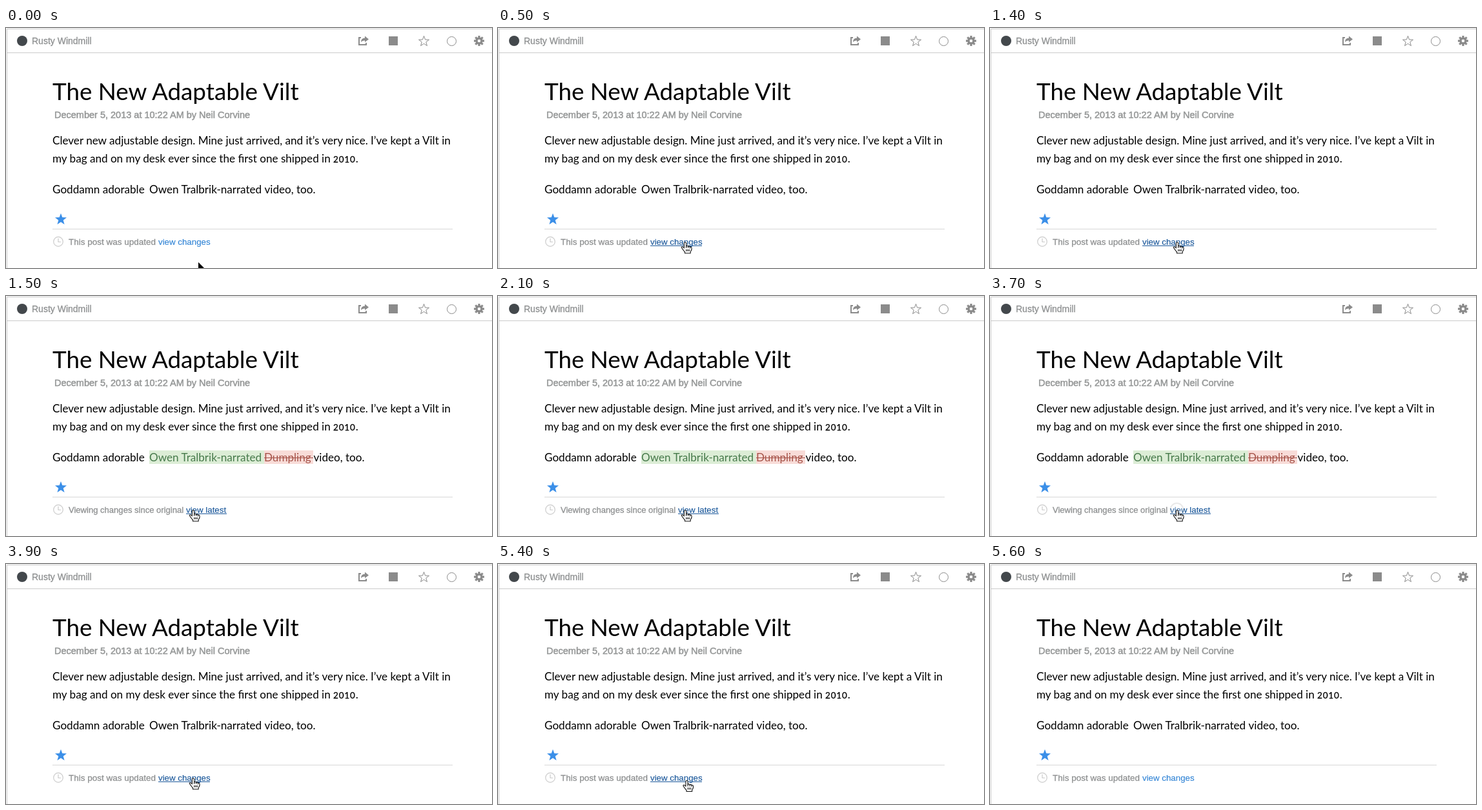
These frames come from a looping animation (753 px wide and 373 px high, 5700 ms). An HTML page:

```html
<!DOCTYPE html>
<html lang="en">
<head>
<meta charset="utf-8">
<title>Post changes</title>
<style>
  html, body { margin: 0; width: 100%; height: 100%; overflow: hidden; background: #fff; }
  svg { display: block; }
  .article { font-family: Lato, sans-serif; font-size: 17.1px; }
  .title { font-family: Lato, sans-serif; font-size: 36.8px; }
  .year { font-size: 13.5px; letter-spacing: .8px; stroke: #000; stroke-width: .25px; }
  .ui { font-family: "Liberation Sans", Arial, sans-serif; font-size: 13.3px; fill: #8e9091; stroke: #8e9091; stroke-width: .3px; }
  .date { font-size: 14.5px; fill: #959797; stroke: #959797; stroke-width: .5px; }
  .link { fill: #3486d6; stroke: #3486d6; stroke-width: .15px; }
  .hover { fill: #1e5a9c; stroke: #1e5a9c; stroke-width: .15px; }
  .icon { fill: #8b8b8b; }
  .line { fill: none; stroke: #8b8b8b; }
  .rule { fill: none; stroke: #cbcbcb; }
</style>
</head>
<body>
<svg width="753" height="373" viewBox="0 0 753 373">
  <path class="rule" d="M753 1.5H1.5V373M1 38.5H753"/>

  <!-- Toolbar -->
  <circle cx="25" cy="20" r="8" fill="#43484c"/>
  <text class="ui" x="40" y="25" style="font-size:14px">Rusty Windmill</text>
  <path class="line" stroke-width="2" d="M550 15H547V26H558V23"/>
  <path class="icon" d="M556 12.5L562 17.5L556 22V19.5Q552 19 550 22Q550 15.5 556 15.5Z"/>
  <rect class="icon" x="593" y="13" width="14" height="14"/>
  <path id="outlineStar" class="line"/>
  <circle class="line" cx="690.5" cy="20.5" r="7"/>
  <g id="gear" transform="translate(733 20)">
    <circle class="line" r="4" stroke-width="3.4"/>
  </g>

  <!-- Article -->
  <text class="title" x="72" y="112">The New Adaptable Vilt</text>
  <text class="ui date" x="75" y="140">December 5, 2013 at 10:22 AM by Neil Corvine</text>
  <g class="article">
    <text x="72" y="181">Clever new adjustable design. Mine just arrived, and it’s very nice. I’ve kept a Vilt in</text>
    <text x="72" y="209">my bag and on my desk ever since the first one shipped in <tspan class="year">2010</tspan>.</text>
    <text x="72" y="257">Goddamn adorable</text>
    <g id="marks">
      <path fill="#dcedd6" d="M222 240H400V261H222Z"/>
      <path fill="#f8dcd8" d="M400 240H476V261H400Z"/>
      <text x="400" y="257" fill="#a65349">Dumpling</text>
      <path stroke="#a65349" d="M400 251.5H476"/>
    </g>
    <text id="added" x="222" y="257">Owen Tralbrik-narrated</text>
    <text id="ending" y="257">video, too.</text>
  </g>

  <!-- Footer -->
  <path id="blueStar" fill="#3b8fe8"/>
  <path stroke="#d8d8d8" d="M72 312.5H692"/>
  <g class="rule" stroke-width="1.2">
    <circle cx="81" cy="332" r="7.3"/>
    <path d="M81 327V332.5H85"/>
  </g>
  <text id="status" class="ui" x="97" y="337"></text>
  <text id="link" class="ui" y="337"></text>
  <path id="underline" stroke="#1e5a9c"/>

  <!-- Pointer -->
  <circle id="ring" cx="289.5" cy="332" fill="#fff" fill-opacity=".9" stroke="#888" stroke-width="2"/>
  <path id="arrow" d="M0 0V16L3.8 12.5L6.3 18L9 17L6.6 11.5H11.5Z" stroke="#fff" stroke-width="1" paint-order="stroke"/>
  <g id="hand" fill="#fff" stroke="#111" stroke-width="1.1" stroke-linejoin="round">
    <path d="M-1.6 9V1.4Q-1.4 0 0 0T1.6 1.4V6Q3.6 4.6 4.6 6.5Q6.6 5.4 7.4 7.3Q10 6.8 10 9V11Q9.5 13 8.2 14.5V17H-.5V15Q-2.5 13.2-4 10.5Q-6.5 8-5 7Q-3.5 6.6-1.6 9Z"/>
    <path fill="none" d="M1.6 6V9M4.6 6.5V9M7.4 7.3V9.5M1.8 11V14M4 11V14M6.2 11V14"/>
  </g>
</svg>
<script>
const LOOP = 5700, STEP = 100;
const FIRST_CLICK = 1000, SECOND_CLICK = 3400, RESPONSE = 500;
const $ = id => document.getElementById(id);
const show = (id, visible) => $(id).style.display = visible ? "" : "none";

function starPath(cx, cy, radius) {
  const points = Array.from({ length: 10 }, (_, i) => {
    const r = i % 2 ? radius * 0.41 : radius;
    const angle = (i / 5 - 0.5) * Math.PI;
    return `${cx + r * Math.cos(angle)} ${cy + r * Math.sin(angle)}`;
  });
  return `M${points.join("L")}Z`;
}

$("outlineStar").setAttribute("d", starPath(647.5, 20.8, 8.4));
$("blueStar").setAttribute("d", starPath(85, 297.5, 9.5));
for (let i = 0; i < 8; i++)
  $("gear").insertAdjacentHTML("beforeend",
    `<rect class="icon" x="-1.6" y="-8" width="3.2" height="4" transform="rotate(${i * 45})"/>`);

function pointerAt(t) {
  if (t <= 500) {
    const left = (1 - t / 500) ** 1.5;
    return { x: 290 + 8 * left, y: 333 + 31 * left };
  }
  if (t < 5400) return { x: 290, y: 333 };
  if (t < 5600) {
    const p = (t - 5300) / 200;
    return { x: 290 + 5 * p, y: 333 + 14 * p * p };
  }
  return null;
}

function drawPost(changed) {
  show("marks", changed);
  $("added").setAttribute("fill", changed ? "#477a4b" : "#000");
  $("ending").setAttribute("x", changed ? 476.5 : 400.5);
  $("status").textContent = changed ? "Viewing changes since original" : "This post was updated";
  $("status").style.fontSize = changed ? "13.05px" : "13.5px";
  $("link").textContent = changed ? "view latest" : "view changes";
  $("link").setAttribute("x", changed ? 279 : 236);
  $("underline").setAttribute("d", changed ? "M279 338.5H342" : "M236 338.5H316");
}

function drawPointer(t) {
  const pointer = pointerAt(t);
  const hovering = !!pointer && pointer.y < 342;
  show("hand", hovering);
  show("arrow", pointer && !hovering);
  show("underline", hovering);
  $("link").setAttribute("class", hovering ? "ui hover" : "ui link");
  if (pointer)
    $(hovering ? "hand" : "arrow").setAttribute("transform", `translate(${pointer.x} ${pointer.y})`);
}

function drawRing(t) {
  const age = t - (t < SECOND_CLICK ? FIRST_CLICK : SECOND_CLICK);
  const visible = age >= 0 && age < 400;
  show("ring", visible);
  if (!visible) return;
  $("ring").setAttribute("r", 7 + age / 100);
  $("ring").setAttribute("opacity", 0.7 * (1 - age / 400));
}

function draw() {
  const t = Math.floor(performance.now() % LOOP / STEP) * STEP;
  drawPost(t >= FIRST_CLICK + RESPONSE && t < SECOND_CLICK + RESPONSE);
  drawPointer(t);
  drawRing(t);
  requestAnimationFrame(draw);
}
draw();
</script>
</body>
</html>
```
